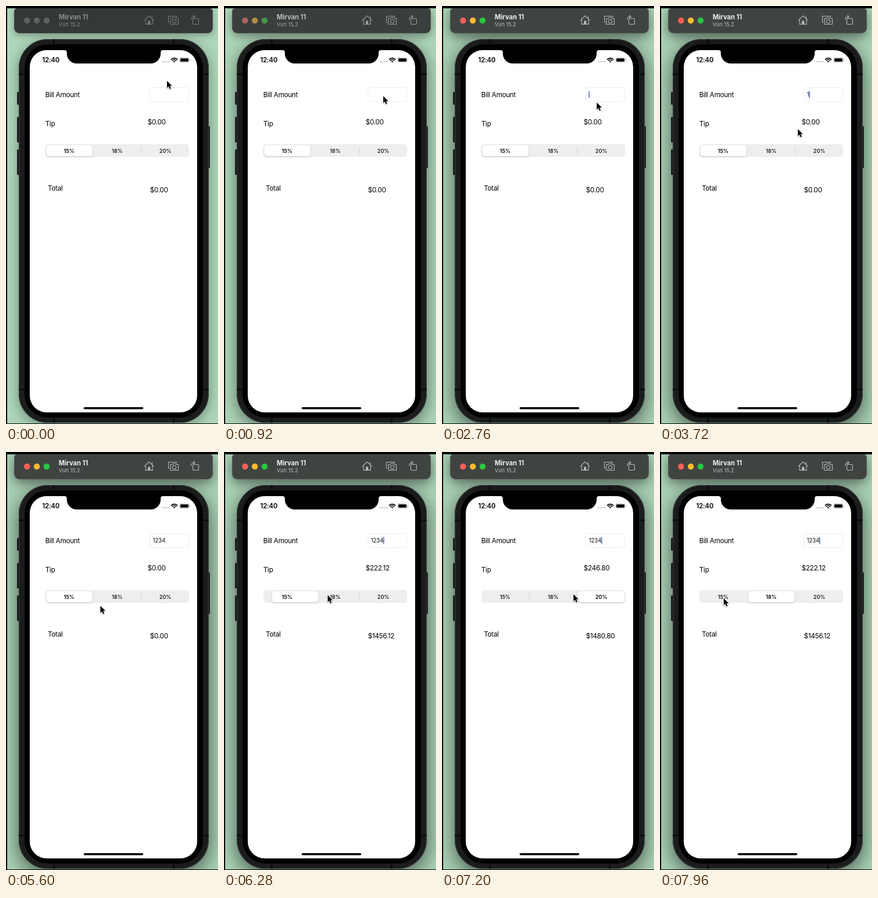
These frames come from a looping animation (366x720 px, 8000 ms). An HTML page with a canvas:

```html
<!DOCTYPE html>
<html lang="en">
<head>
<meta charset="utf-8">
<title>Tip calculator</title>
<style>
html, body { margin: 0; width: 100%; height: 100%; overflow: hidden; background: #000; }
canvas { display: block; width: 366px; height: 720px; }
</style>
</head>
<body>
<canvas id="stage"></canvas>
<script>
const W = 366, H = 720, LOOP = 8000, STEP = 40;
const FONT = 'Inter, "Liberation Sans", sans-serif';
const canvas = document.getElementById('stage');
const dpr = window.devicePixelRatio || 1;
canvas.width = W * dpr;
canvas.height = H * dpr;
const c = canvas.getContext('2d');

// Pointer path: time, x, y
const PATH = [
  [0, 278, 129], [520, 278, 129], [560, 275, 155], [1440, 275, 155],
  [1680, 266, 153], [2320, 266, 153], [2480, 277, 151], [2720, 277, 151],
  [2880, 238, 212], [5440, 238, 212], [5600, 163, 265], [5720, 148, 273],
  [5900, 152, 270], [6120, 179, 247], [6480, 179, 246], [6800, 262, 248],
  [6960, 262, 248], [7200, 227, 245], [7440, 184, 246], [7600, 182, 246],
  [7920, 111.5, 252], [7960, 110, 252]
];
const KEYS = [3720, 3920, 4720, 4960];
const CARET_X = [254, 258, 264, 270, 275.7];
const PICKS = [[6250, 1], [6890, 2], [7500, 1]];
const RATES = [0.15, 0.18, 0.2];
const SEG = 83;

const clamp = v => Math.max(0, Math.min(1, v));
const mix = (a, b, k) => a + (b - a) * k;
const tone = (a, b, k) => `rgb(${a.map((v, i) => Math.round(mix(v, b[i], k)))})`;
const grey = (a, b, k) => tone([a, a + 3, a + 1], [b, b + 2, b + 1], k);

function pointerAt(t) {
  for (let i = 1; i < PATH.length; i++) {
    const a = PATH[i - 1], b = PATH[i];
    if (t <= b[0]) {
      const k = (t - a[0]) / (b[0] - a[0]);
      return [mix(a[1], b[1], k), mix(a[2], b[2], k)];
    }
  }
  return PATH[PATH.length - 1].slice(1);
}

function thumbAt(t) {
  let pos = 0;
  for (const [start, index] of PICKS) {
    if (t < start) break;
    const u = (t - start) * 0.024;
    pos = mix(pos, index, 1 - (1 + u) * Math.exp(-u));
  }
  return pos;
}

function caretAlpha(t) {
  const resets = [2320, ...KEYS].filter(k => k <= t);
  if (!resets.length) return 0;
  const p = (t - resets[resets.length - 1]) % 880;
  if (p < 500) return t - resets[resets.length - 1] < 880 ? 1 : 1;
  return p < 800 ? 1 - clamp((p - 500) / 80) : clamp((p - 800) / 80);
}

function box(x, y, w, h, r, fill) {
  c.beginPath();
  c.roundRect(x, y, w, h, r);
  if (fill) {
    c.fillStyle = fill;
    c.fill();
  }
}

function dot(x, y, r, fill) {
  c.beginPath();
  c.arc(x, y, r, 0, Math.PI * 2);
  c.fillStyle = fill;
  c.fill();
}

function text(str, x, y, size, weight, fill, gap = 0, align = 'left') {
  c.font = `${weight} ${size}px ${FONT}`;
  c.letterSpacing = gap + 'px';
  c.textAlign = align;
  c.fillStyle = fill;
  c.fillText(str, x, y);
}

function shadow(alpha, blur, dy) {
  c.shadowColor = `rgba(0,0,0,${alpha})`;
  c.shadowBlur = blur * dpr;
  c.shadowOffsetY = dy * dpr;
}

function noShadow() {
  c.shadowColor = 'transparent';
  c.shadowBlur = c.shadowOffsetY = 0;
}

function backdrop(on) {
  c.fillStyle = tone([174, 214, 186], [171, 211, 183], on);
  c.fillRect(0, 0, W, H);
}

function phone(on) {
  const key = '#222423';
  box(19, 148, 6, 22, 1.5, key);
  box(19, 191, 6, 44, 1.5, key);
  box(19, 247, 6, 44, 1.5, key);
  box(346, 207, 6, 72, 1.5, key);

  shadow(mix(0.36, 0.58, on), mix(22, 34, on), mix(5, 10, on));
  box(22, 57, 328, 661, 50, '#1b1c1c');
  noShadow();
  box(22.7, 57.7, 326.6, 659.6, 49);
  c.strokeStyle = '#343636';
  c.lineWidth = 1.4;
  c.stroke();
  c.fillStyle = '#0c0d0d';
  for (const y of [116, 659]) {
    c.fillRect(22, y, 10, 3);
    c.fillRect(340, y, 10, 3);
  }
  for (const x of [81, 288]) {
    c.fillRect(x, 57, 3, 8);
    c.fillRect(x, 710, 3, 8);
  }
  box(32, 66, 308, 643, 40, '#000');
  box(41, 76, 289, 624, 29, '#fff');

  c.beginPath();
  c.moveTo(101, 75);
  c.lineTo(101, 76);
  c.quadraticCurveTo(105, 76, 105, 80);
  c.arcTo(105, 99, 124, 99, 17);
  c.arcTo(267, 99, 267, 80, 17);
  c.lineTo(267, 80);
  c.quadraticCurveTo(267, 76, 271, 76);
  c.lineTo(271, 75);
  c.fillStyle = '#000';
  c.fill();
  box(134, 691, 103, 3.6, 1.8, '#000');
}

function statusBar() {
  text('12:40', 62.5, 97, 11.3, 600, '#000', -0.1);
  for (let i = 0; i < 4; i++) dot(270.6 + i * 3.5, 96, 1.3, '#c4c4c6');
  c.strokeStyle = '#000';
  c.lineWidth = 1.7;
  for (const r of [7.2, 4.5]) {
    c.beginPath();
    c.arc(290.5, 97, r, -Math.PI * 0.75, -Math.PI * 0.25);
    c.stroke();
  }
  c.beginPath();
  c.moveTo(290.5, 97.4);
  c.arc(290.5, 97.4, 2.6, -Math.PI * 0.75, -Math.PI * 0.25);
  c.fillStyle = '#000';
  c.fill();
  box(299.8, 89, 16.4, 8, 2.4);
  c.strokeStyle = '#a5a5a7';
  c.lineWidth = 0.8;
  c.stroke();
  box(301, 90.2, 14, 5.6, 1.4, '#000');
  box(317, 91.7, 1, 2.6, 0.5, '#a5a5a7');
}

function toolbar(on) {
  shadow(mix(0.3, 0.5, on), mix(12, 20, on), mix(3, 6, on));
  box(14, 4, 343, 43, [5, 5, 9, 9], tone([52, 56, 54], [64, 68, 65], on));
  noShadow();
  box(14.5, 4.5, 342, 42, [5, 5, 9, 9]);
  c.strokeStyle = 'rgba(255,255,255,0.07)';
  c.lineWidth = 1;
  c.stroke();

  const lights = [[255, 95, 87], [254, 188, 46], [40, 200, 64]];
  lights.forEach((rgb, i) => dot(36.3 + i * 16.9, 25, 5.2, tone([94, 98, 96], rgb, on)));
  text('Mirvan 11', 91, 23.3, 11.2, 700, grey(138, 236, on));
  text('Vun 15.2', 91, 35, 9.2, 400, grey(134, 186, on));
  icons(grey(122, 184, on));
}

function icons(color) {
  c.strokeStyle = c.fillStyle = color;
  c.lineWidth = 1.1;
  c.lineJoin = c.lineCap = 'round';
  // Home
  c.beginPath();
  c.moveTo(238.8, 24.6);
  c.lineTo(247, 17);
  c.lineTo(255.2, 24.6);
  c.moveTo(241, 23.2);
  c.lineTo(241, 31.4);
  c.lineTo(253, 31.4);
  c.lineTo(253, 23.2);
  c.moveTo(252.3, 21.4);
  c.lineTo(252.3, 18);
  c.stroke();
  c.fillRect(245, 25.5, 4, 6);
  // Camera
  c.beginPath();
  c.moveTo(282, 28);
  c.lineTo(280.5, 28);
  c.lineTo(280.5, 17.5);
  c.lineTo(294.5, 17.5);
  c.lineTo(294.5, 19);
  c.stroke();
  c.beginPath();
  c.moveTo(284, 21.5);
  c.lineTo(287, 21.5);
  c.lineTo(288, 20);
  c.lineTo(293, 20);
  c.lineTo(294, 21.5);
  c.lineTo(297.5, 21.5);
  c.lineTo(297.5, 31.5);
  c.lineTo(284, 31.5);
  c.closePath();
  c.stroke();
  c.beginPath();
  c.arc(290.6, 26.3, 3.1, 0, Math.PI * 2);
  c.stroke();
  // Rotate
  box(322.5, 21.5, 10, 10, 1.5);
  c.stroke();
  c.beginPath();
  c.moveTo(319.7, 23.5);
  c.quadraticCurveTo(319.7, 18.3, 326, 18.3);
  c.moveTo(323.8, 16);
  c.lineTo(326.2, 18.3);
  c.lineTo(323.8, 20.6);
  c.stroke();
}

function field(t) {
  box(248.5, 140.5, 67, 24, 3.5);
  c.strokeStyle = '#ebebec';
  c.lineWidth = 0.9;
  c.stroke();
  const count = KEYS.filter(k => k <= t).length;
  text('1234'.slice(0, count), 253.6, 156.2, 9.7, 400, '#111', -0.18);
  c.globalAlpha = caretAlpha(t);
  box(CARET_X[count] - 0.7, 146.3, 1.4, 12.4, 0.7, '#4162c4');
  c.globalAlpha = 1;
}

function segments(t) {
  const pos = thumbAt(t), chosen = Math.round(pos);
  box(68, 238, 248, 22, 5.5, '#eeeeef');
  c.fillStyle = '#d5d5d8';
  for (const i of [0, 1]) {
    if (chosen !== i && chosen !== i + 1) c.fillRect(150 + i * SEG, 243, 1, 12.5);
  }
  shadow(0.2, 3, 1.2);
  box(69.4 + pos * SEG, 239.4, 80, 19.4, 4.8, '#fff');
  noShadow();
  RATES.forEach((rate, i) => {
    text(Math.round(rate * 100) + '%', 109 + i * SEG, 252.5, 9.1,
      i === chosen ? 600 : 500, '#000', -0.05, 'center');
  });
}

function labels(t) {
  const pick = PICKS.filter(p => p[0] <= t).pop();
  const bill = pick ? 1234 : 0;
  const tip = pick ? bill * RATES[pick[1]] : 0;
  const put = (str, x, y) => text(str, x, y, 11.8, 400, '#000', -0.32);
  put('Bill Amount', 67.8, 157);
  put('Tip', 67.8, 206.5);
  put('Total', 72.2, 318);
  put('$' + tip.toFixed(2), 244.5, 203.5);
  put('$' + (bill + tip).toFixed(2), 248.5, 320.7);
}

function pointer(x, y) {
  const pts = [[0, 0], [0, 12], [2.7, 9.5], [4.6, 13.9], [6.7, 13], [4.8, 8.8], [8.5, 8.6]];
  c.beginPath();
  pts.forEach(([px, py]) => c.lineTo(x + px, y + py));
  c.closePath();
  c.lineJoin = 'round';
  c.lineWidth = 1.7;
  c.strokeStyle = '#fff';
  shadow(0.35, 2, 0.8);
  c.stroke();
  noShadow();
  c.fillStyle = '#000';
  c.fill();
}

function edges() {
  c.fillStyle = '#000';
  c.fillRect(0, 0, W, 4);
  c.fillRect(0, 0, 2, H);
  c.fillRect(0, 719, W, 1);
}

function draw(t) {
  const on = clamp((t - 880) / 80);
  c.setTransform(dpr, 0, 0, dpr, 0, 0);
  backdrop(on);
  phone(on);
  toolbar(on);
  edges();
  statusBar();
  labels(t);
  field(t);
  segments(t);
  pointer(...pointerAt(t));
}

const begin = performance.now();
function tick() {
  const t = (performance.now() - begin) % LOOP;
  draw(Math.floor(t / STEP) * STEP);
  requestAnimationFrame(tick);
}
tick();
</script>
</body>
</html>
```
